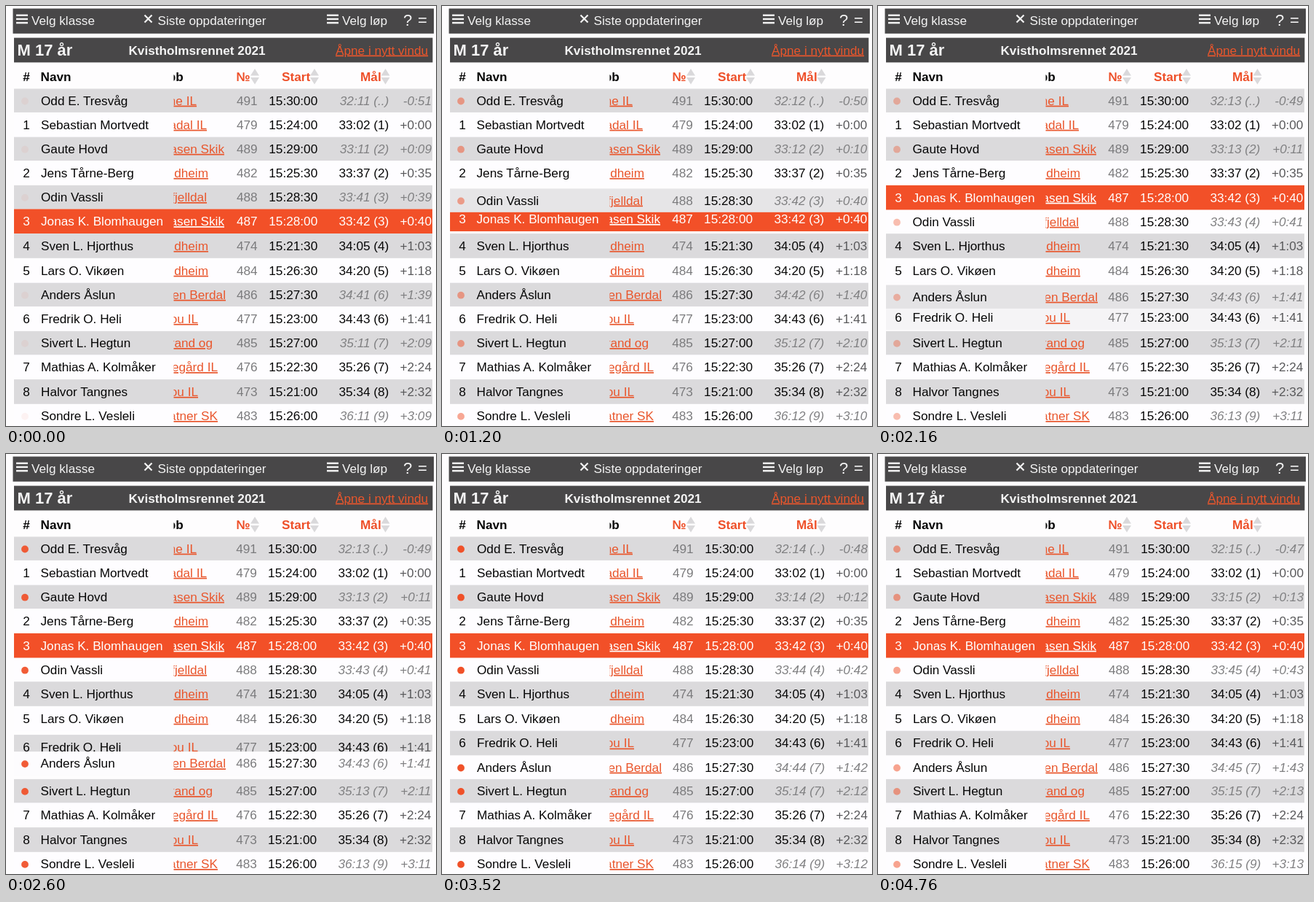
These frames come from a looping animation (591 px wide and 576 px high, 4800 ms). An HTML page:

```html
<!DOCTYPE html>
<html lang="no">
<head>
<meta charset="utf-8">
<title>Resultater</title>
<style>
html, body { margin: 0; width: 100%; height: 100%; overflow: hidden; background: #fefdfe; }
svg { display: block; width: 591px; height: 576px; }
text { font: 17.2px "Liberation Sans", Arial, sans-serif; fill: #060606; white-space: pre; }
.bold { font-weight: bold; }
.light { fill: #f4f4f4; }
.link { fill: #e9562c; text-decoration: underline; }
.orange { fill: #ee4f28; }
.num { fill: #7a7a7c; }
.diff { fill: #58585a; }
.run .goal, .run .diff { fill: #808082; font-style: italic; }
.hot text { fill: #fff; }
</style>
</head>
<body>
<svg id="stage" viewBox="0 0 591 576">
  <defs><clipPath id="clubClip"><rect x="230.5" y="-50" width="90" height="700"/></clipPath></defs>
</svg>
<script>
const LOOP = 4800, TOP = 113.5;
const TALL = 33.8, SHORT = 32.4;   // rows of finished and of running skiers
const SWAP = 800, FADE = 600;
const LEADER = 1982;
const stage = document.getElementById('stage');

function el(parent, tag, attrs, text) {
  const node = document.createElementNS('http://www.w3.org/2000/svg', tag);
  for (const k in attrs) node.setAttribute(k, attrs[k]);
  if (text !== undefined) node.textContent = text;
  parent.appendChild(node);
  return node;
}
const label = (parent, x, y, text, cls = '', anchor = 'start') =>
  el(parent, 'text', { x, y, class: cls, 'text-anchor': anchor }, text);

const pad = n => String(n).padStart(2, '0');
const clock = s => pad(Math.floor(s / 60)) + ':' + pad(s % 60);
const gap = s => (s < 0 ? '-' : '+') + Math.floor(Math.abs(s) / 60) + ':' + pad(Math.abs(s) % 60);
const startTime = num => '15:' + clock(21 * 60 + 30 * (num - 473));
const clamp = v => Math.min(1, Math.max(0, v));

// name, club, right edge of club, number, finish seconds (0 = still running)
const runners = [
  ['Odd E. Tresvåg', 'Kvistorne IL', 262, 491, 0],
  ['Sebastian Mortvedt', 'Blåvadal IL', 276, 479, 1982],
  ['Gaute Hovd', 'Tverlasen Skik', 300, 489, 0],
  ['Jens Tårne-Berg', 'Vollindheim', 278, 482, 2017],
  ['Odin Vassli', 'Orrefjelldal', 276, 488, 0],
  ['Jonas K. Blomhaugen', 'Tverlasen Skik', 300, 487, 2022],
  ['Sven L. Hjorthus', 'Vollindheim', 278, 474, 2045],
  ['Lars O. Vikøen', 'Vollindheim', 278, 484, 2060],
  ['Anders Åslun', 'Lauvlien Berdal', 302, 486, 0],
  ['Fredrik O. Heli', 'Skarvmou IL', 264, 477, 2083],
  ['Sivert L. Hegtun', 'Rognstrand og', 284, 485, 0],
  ['Mathias A. Kolmåker', 'Brennegård IL', 291, 476, 2126],
  ['Halvor Tangnes', 'Skarvmou IL', 264, 473, 2134],
  ['Sondre L. Vesleli', 'Holmvatner SK', 291, 483, 0]
].map(([name, club, edge, num, done], slot) => ({ name, club, edge, num, done, slot }));

let nextTop = TOP;
for (const r of runners) {
  r.height = r.done ? TALL : SHORT;
  r.y = nextTop;
  nextTop += r.height;
}

// a running skier sinks below the finished one in the next slot
function swap(slot, at) {
  const down = runners[slot], up = runners[slot + 1], top = down.y;
  down.move = { at, from: top, to: top + TALL, slot: slot + 1 };
  up.move = { at, from: top + TALL, to: top, slot };
}
swap(4, 1010);
swap(8, 2010);

const finishes = runners.map(r => r.done).filter(Boolean);
const rank = s => finishes.filter(f => f < s).length + 1;

function menuIcon(x) {
  for (let i = 0; i < 3; i++)
    el(stage, 'rect', { x, y: 11.5 + 5.2 * i, width: 16, height: 2.4, fill: '#f4f4f4' });
}

function drawHeader() {
  el(stage, 'rect', { x: 9.5, y: 3.5, width: 578.5, height: 34.3, fill: '#484748' });
  el(stage, 'rect', { x: 11, y: 43.6, width: 575.4, height: 33.8, fill: '#484748' });
  menuIcon(14);
  label(stage, 35, 26.4, 'Velg klasse', 'light');
  el(stage, 'path', { d: 'M190.5 12.5l10 10m0-10l-10 10', stroke: '#f4f4f4', 'stroke-width': 2.2 });
  label(stage, 208.5, 26.4, 'Siste oppdateringer', 'light');
  menuIcon(441);
  label(stage, 462, 26.4, 'Velg løp', 'light');
  label(stage, 546, 27.4, '?', 'light').style.fontSize = '22px';
  label(stage, 566, 27.4, '=', 'light').style.fontSize = '22px';
  label(stage, 15.5, 67.8, 'M 17 år', 'bold light').style.fontSize = '22px';
  label(stage, 262.5, 66.5, 'Kvistholmsrennet 2021', 'bold light', 'middle');
  label(stage, 453, 66.5, 'Åpne i nytt vindu', 'link');
  label(stage, 28, 103, '#', 'bold', 'middle');
  label(stage, 47.5, 103, 'Navn', 'bold');
  const clip = el(stage, 'g', { 'clip-path': 'url(#clubClip)' });
  label(clip, 195, 103, 'Klubb', 'bold');
  [[316.5, '№', 342], [379, 'Start', 424], [487, 'Mål', 521.5]].forEach(([x, text, ax]) => {
    label(stage, x, 103, text, 'bold orange');
    el(stage, 'path', { d: `M${ax - 6} 95.5l6-9.5 6 9.5zm0 2.5l6 9.5 6-9.5z`, fill: '#dad9db' });
  });
}

function buildRow(r) {
  r.hot = r.num === 487;
  const g = r.g = el(rows, 'g', { class: r.hot ? 'hot' : r.done ? '' : 'run' });
  r.bg = el(g, 'rect', { x: 11, y: 0, width: 575, height: r.height, fill: '#f25028' });
  const base = r.height / 2 + 5.9;
  if (r.done) label(g, 28, base, rank(r.done), '', 'middle');
  else r.dot = el(g, 'circle', { cx: 26, cy: base - 5.1, r: 4.9, fill: '#f05028' });
  r.cells = [
    [label(g, 48, base, r.name), -0.5],
    [label(g, 317, base, r.num, 'num'), -0.8],
    [label(g, 361.3, base, startTime(r.num)), -1.2],
    [r.goal = label(g, 526.3, base, '', 'goal', 'end'), -1],
    [r.diff = label(g, 585, base, '', 'diff', 'end'), -0.6]
  ];
  const clip = el(g, 'g', { 'clip-path': 'url(#clubClip)' });
  label(clip, r.edge, base, r.club, 'link', 'end');
}

const shade = slot => slot % 2 ? 254 : 219;

// top and grey level of a row at time t
function place(r, t) {
  const m = r.move;
  if (!m || t < m.at) return { y: r.y, grey: shade(r.slot) };
  const eased = 0.5 - 0.5 * Math.cos(Math.PI * clamp((t - m.at) / SWAP));
  const fade = clamp((t - m.at) / FADE);
  return {
    y: m.from + (m.to - m.from) * eased,
    grey: Math.round(shade(r.slot) + (shade(m.slot) - shade(r.slot)) * fade)
  };
}

function draw(t) {
  const tick = Math.floor(t / 1000);
  const narrow = tick === 1 || tick === 2;
  const wave = 0.5 - 0.5 * Math.cos(2 * Math.PI * (t / 1000 + 0.015));
  const glow = 0.06 + 0.94 * (1 - Math.pow(1 - wave, 1.25));
  for (const r of runners) {
    const { y, grey } = place(r, t);
    r.g.setAttribute('transform', `translate(0 ${y.toFixed(2)})`);
    if (!r.hot) r.bg.setAttribute('fill', `rgb(${grey},${grey - 1},${grey + 1})`);
    const s = r.done || 1931 + 30 * (491 - r.num) + tick;
    r.goal.textContent = `${clock(s)} (${s < LEADER ? '..' : rank(s)})`;
    r.diff.textContent = gap(s - LEADER);
    if (r.dot) r.dot.setAttribute('opacity', glow.toFixed(3));
    for (const [cell, dx] of r.cells)
      cell.setAttribute('transform', `translate(${narrow ? dx : 0} 0)`);
  }
}

drawHeader();
const rows = el(stage, 'g', {});
// running skiers are painted above finished ones
runners.filter(r => r.done).forEach(buildRow);
runners.filter(r => !r.done).forEach(buildRow);

const begin = performance.now();
function frame() {
  draw((performance.now() - begin) % LOOP);
  requestAnimationFrame(frame);
}
draw(0);
requestAnimationFrame(frame);
</script>
</body>
</html>
```
